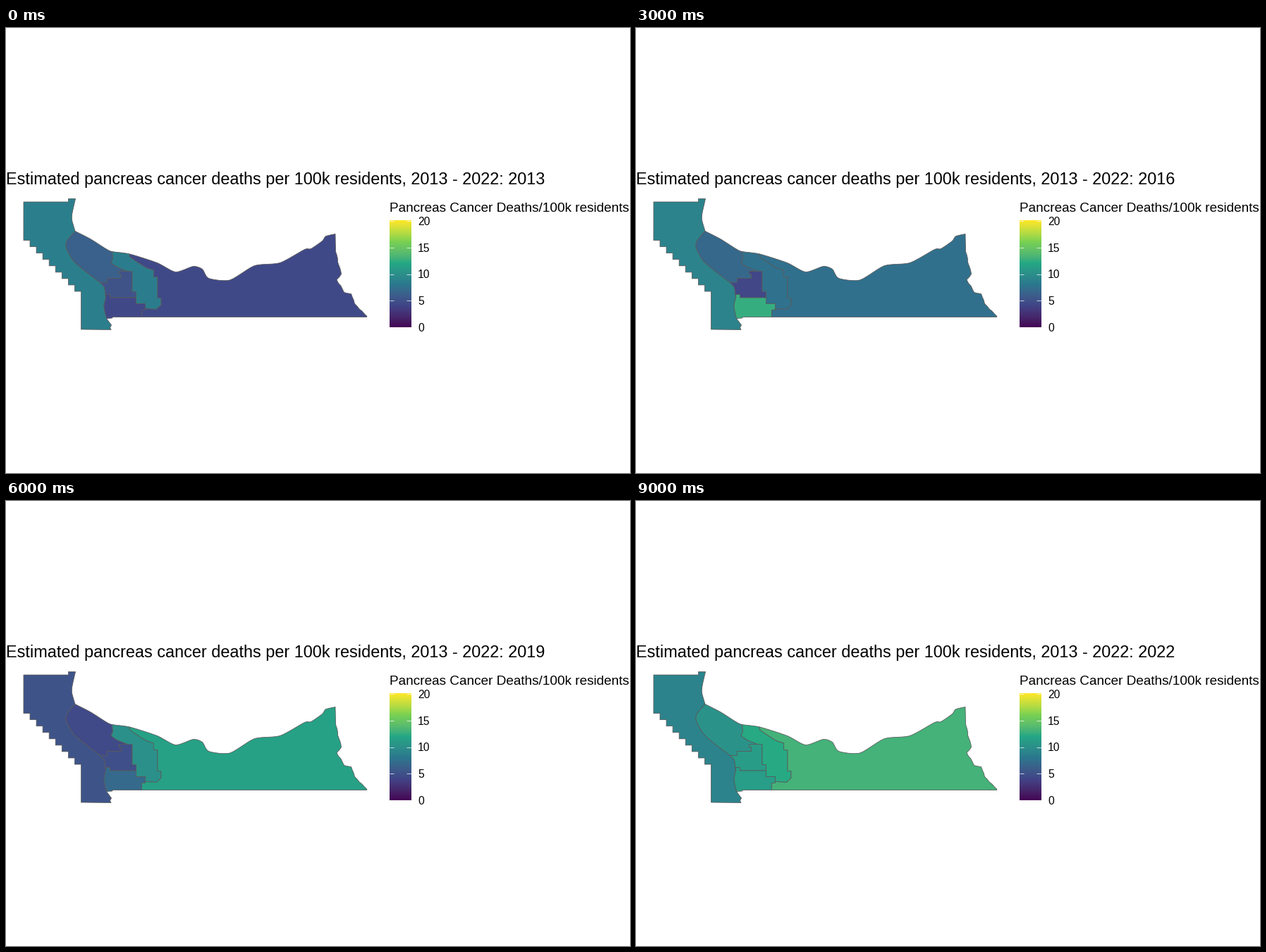
Recreate the animation shown at these times as a matplotlib script. Size 885 px wide and 632 px high, loop 10000 ms.

```python
import numpy as np
import matplotlib.pyplot as plt
from matplotlib.animation import FuncAnimation
from matplotlib.patches import Polygon

W, H, DPI = 885, 632, 100
FIRST_YEAR, YEARS = 2013, 10
PT = 72 / DPI  # points per pixel
rng = np.random.default_rng(4)

# --- colour scale: six stops blended in Lab space ---
STOPS = ["440154", "414487", "2A788E", "22A884", "7AD151", "FDE725"]
TO_XYZ = np.array([[0.4124, 0.3576, 0.1805],
                   [0.2126, 0.7152, 0.0722],
                   [0.0193, 0.1192, 0.9505]])
WHITE = TO_XYZ.sum(axis=1)


def rgb_to_lab(rgb):
    lin = np.where(rgb > 0.04045, ((rgb + 0.055) / 1.055) ** 2.4, rgb / 12.92)
    t = lin @ TO_XYZ.T / WHITE
    f = np.where(t > 0.008856, np.cbrt(t), 7.787 * t + 16 / 116)
    x, y, z = f.T
    return np.column_stack([116 * y - 16, 500 * (x - y), 200 * (y - z)])


def lab_to_rgb(lab):
    light, a, b = lab.T
    y = (light + 16) / 116
    f = np.column_stack([y + a / 500, y, y - b / 200])
    t = np.where(f > 0.2069, f ** 3, (f - 16 / 116) / 7.787)
    lin = np.clip(t * WHITE @ np.linalg.inv(TO_XYZ).T, 0, 1)
    rgb = np.where(lin > 0.0031308, 1.055 * lin ** (1 / 2.4) - 0.055, 12.92 * lin)
    return np.clip(rgb, 0, 1)


STOP_LAB = rgb_to_lab(np.array(
    [[int(h[i:i + 2], 16) / 255 for i in (0, 2, 4)] for h in STOPS]))


def scale(values):
    v = np.asarray(values) / 4
    return lab_to_rgb(np.column_stack(
        [np.interp(v, range(6), channel) for channel in STOP_LAB.T]))


# --- border builders ---
N = 6  # pieces per curve span


def smooth(*keys):
    """Cardinal spline through the key points."""
    p = np.array(keys, float)
    m = 0.35 * np.gradient(p, axis=0) * 2
    t = np.arange(N)[:, None] / N
    spans = [(2 * t**3 - 3 * t**2 + 1) * p[k] + (t**3 - 2 * t**2 + t) * m[k]
             + (3 * t**2 - 2 * t**3) * p[k + 1] + (t**3 - t**2) * m[k + 1]
             for k in range(len(p) - 1)]
    return np.vstack(spans + [p[-1:]])


def steps(start, *moves):
    """Right-angled path: across, down, across, down ..."""
    path = [np.array(start, float)]
    for k, d in enumerate(moves):
        path.append(path[-1] + ((d, 0) if k % 2 == 0 else (0, d)))
    return np.array(path)


def ragged(*keys, gap=5, amount=0.8):
    """Straight spans broken up by small seeded wobbles."""
    path = []
    for a, b in zip(np.array(keys[:-1], float), np.array(keys[1:], float)):
        n = max(1, round(np.hypot(*(b - a)) / gap))
        path += [a + (b - a) * k / n + (rng.uniform(-amount, amount, 2) if k else 0)
                 for k in range(n)]
    return np.vstack([path, keys[-1:]])


# --- borders, shared between neighbouring regions ---
coast = smooth((97.5, 288), (119, 299), (141, 313), (150, 317), (175, 320.5),
               (214, 333), (240, 346), (265, 338), (278, 342), (287, 355),
               (317, 357.5), (352, 337), (388, 333), (423, 314), (432, 313),
               (448, 302), (453, 295.3), (466.5, 292))
mid_coast, strip_coast, river = (coast[:3 * N + 1], coast[3 * N:4 * N + 1],
                                 coast[4 * N:])
north_river = smooth((98, 242), (93.5, 262), (93, 272), (97.5, 288))
west_mid = smooth((97.5, 288), (86, 302), (85, 312), (95, 330), (112, 345),
                  (133, 361))
west_centre = smooth((133, 361), (139, 368), (141, 383))
west_south = smooth((141, 383), (138.5, 395), (142, 412))
west_tip = [(142, 412), (149, 421.5), (147, 425), (148.5, 428), (106, 427.5)]
stairs = steps((106, 373.5), *[-9.06] * 17)
north_edge = steps((24.5, 246.5), 63.5, -4.5, 10)

mid_strip = [(150, 317), (151, 327), (148.5, 333), (157, 339), (172, 345)]
mid_centre = steps((172, 345), -12, 4, 3, 6, -20, 6, -10)
centre_strip = steps((172, 345), 6.5, 29, 5.5, 8.5)
centre_south = steps((184, 382.5), -37, -4.5, -6, 5)
south_strip = steps((184, 382.5), 0, 8.5, 13, 7)
south_east = steps((197, 398), 0, 2, -5, 10)
south_base = [(192, 410), (151, 410), (150, 411.5), (142, 412)]
strip_east = np.vstack([smooth((175, 320.5), (176, 325), (197, 339), (208, 343)),
                        steps((208, 343), 1, 10, 5.5, 30, 5, 10),
                        [(213, 399), (197, 398)]])
east_edge = np.vstack([[(466.5, 292)],
                       ragged((467, 317), (470, 332), (475, 349), (468.5, 357),
                              (479, 375), (489, 377), (494, 391), (511.5, 409))])
east_base = [(511, 410), (192, 410)]

REGIONS = {
    "west": (north_edge, north_river, west_mid, west_centre, west_south,
             west_tip, stairs),
    "middle": (mid_coast, mid_strip, mid_centre, west_mid[::-1]),
    "centre": (mid_centre[::-1], centre_strip, centre_south, west_centre[::-1]),
    "strip": (strip_coast, strip_east, south_strip[::-1], centre_strip[::-1],
              mid_strip[::-1]),
    "south": (centre_south[::-1], south_strip, south_east, south_base,
              west_south[::-1]),
    "east": (river, east_edge, east_base, south_east[::-1], strip_east[::-1]),
}

# key years; the years between take the value halfway
KEY_YEARS = [2013, 2015, 2017, 2018, 2020, 2021, 2022]
RATES = {
    "west": [8.6, 8.4, 9.4, 4.2, 6.2, 4.8, 8.9],
    "middle": [6.2, 4.1, 9.4, 5.7, 3.2, 6.4, 10.2],
    "centre": [5.1, 6.8, 1.6, 4.1, 5.6, 4.6, 11],
    "strip": [8.4, 8.9, 6, 8.8, 11.2, 12, 12.1],
    "south": [4.3, 12, 13, 8.2, 5.6, 11.9, 11.1],
    "east": [4.4, 10.1, 4.7, 6.6, 16.2, 9, 13],
}

# --- stage, with whole numbers at pixel centres ---
plt.rcParams["font.family"] = "Liberation Sans"
fig = plt.figure(figsize=(W / DPI, H / DPI), dpi=DPI, facecolor="white")
ax = fig.add_axes([0, 0, 1, 1])
ax.axis("off")


def label(x, y, text, px):
    return ax.text(x, y, text, fontsize=px * PT, color="black",
                   ha="left", va="baseline")


shapes = {name: ax.add_patch(Polygon(np.vstack(paths), closed=True, ec="#595959",
                                     lw=0.8 * PT, joinstyle="round"))
          for name, paths in REGIONS.items()}
title = label(-0.1, 221.5, "", 23.45)

# --- legend ---
LEFT, RIGHT, TOP, BOTTOM = 543.5, 574, 273.5, 425
label(543.4, 260.8, "Pancreas Cancer Deaths/100k residents", 19.05)
bar = scale(np.linspace(20, 0, 300))[:, None, :]
ax.imshow(bar, extent=(LEFT, RIGHT, BOTTOM, TOP), aspect="auto",
          interpolation="nearest")
for v in range(0, 21, 5):
    y = BOTTOM - 0.3 + (TOP - BOTTOM + 0.6) * v / 20
    for x in (LEFT, RIGHT - 6.1):
        ax.plot([x, x + 6.1], [y, y], color="white", lw=0.7 * PT,
                solid_capstyle="butt")
    label(583.4, y + 5.6, str(v), 15.64)
ax.set_xlim(-0.5, W - 0.5)
ax.set_ylim(H - 0.5, -0.5)


def draw(i):
    year = FIRST_YEAR + i
    rates = [np.interp(year, KEY_YEARS, RATES[name]) for name in shapes]
    for shape, color in zip(shapes.values(), scale(rates)):
        shape.set_facecolor(color)
    title.set_text("Estimated pancreas cancer deaths per 100k residents, "
                   f"2013 - 2022: {year}")
    return [*shapes.values(), title]


anim = FuncAnimation(fig, draw, frames=YEARS, interval=1000,
                     repeat=True, repeat_delay=0)
plt.show()
```
